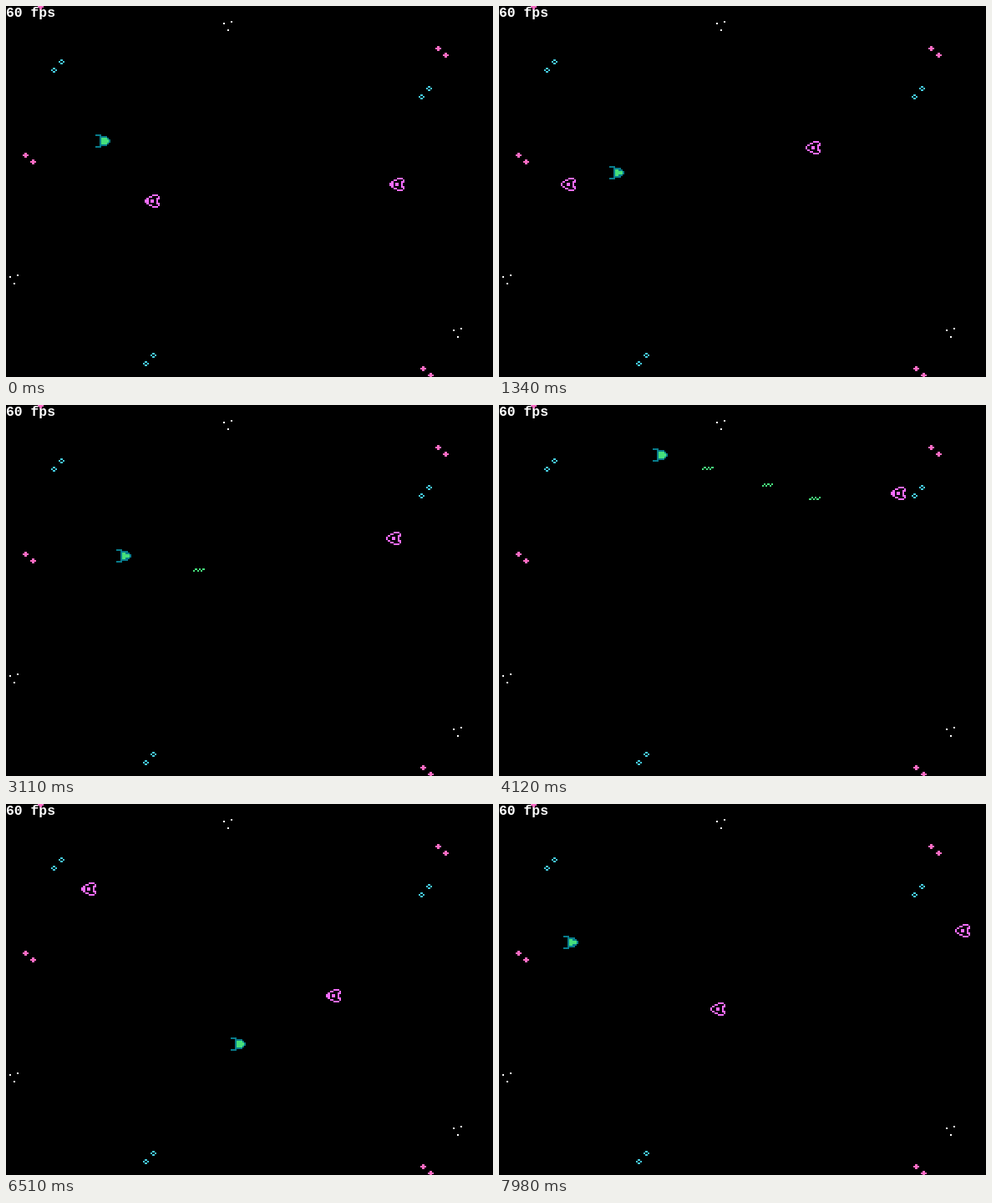
An HTML page with a canvas for the animation above (8000 ms loop, 583 px wide and 445 px high).

```html
<!DOCTYPE html>
<html lang="en">
<head>
<meta charset="utf-8">
<title>Space shooter</title>
<style>
html, body { margin: 0; width: 100%; height: 100%; overflow: hidden; background: #000; }
canvas { display: block; width: 583px; height: 445px; }
</style>
</head>
<body>
<canvas id="stage" width="583" height="445"></canvas>
<script>
const ctx = document.getElementById('stage').getContext('2d');
const W = 583, H = 445, LOOP = 8000;
const CELL_W = 2.25, CELL_H = 2;
const COLORS = {
  t: '#087c8c', g: '#46e07c', m: '#f46cff', p: '#ff6cc4', c: '#44c8dc', w: '#fff'
};

// Ships are symmetric about their long axis.
const mirror = half => [...half, ...half.slice().reverse()];
const SHIPS = [
  mirror(['ttt', '..tttt', '..tgggt', '..tggggt']),
  mirror(['ttt', '..tttt', '..tggtt', '..tggggt'])
];
const ENEMIES = ['mm.mm.m', 'm..mm.m'].map(middle =>
  mirror(['....mmm', '..mm...m', '.m....mm', middle]));
const BULLET = ['.g.g.g', 'g.g.g'];

// Clusters repeat one small shape at offsets counted in cells.
const STARS = [
  { shape: ['.p', 'ppp', '.p'], cells: [[0, 0], [4, 4]],
    at: [[20, 176], [514, 48], [496, 432], [29, -10]] },
  { shape: ['.c', 'c.c', '.c'], cells: [[4, 0], [0, 5]],
    at: [[54, 64], [494, 96], [164, 416]] },
  { shape: ['w'], cells: [[0, 1], [4, 0], [2, 5]],
    at: [[260, 18], [4, 322], [535, 386]] }
];

// Steering: from each time on, the ship heads for the given place.
const STEER_X = [[600, 132], [3285, 184], [4880, 269], [6600, 77]];
const STEER_Y = [
  [0, 138], [300, 200], [1970, 232], [2237, 198], [2970, 50], [4347, 296], [6443, 142], [7727, 166]
];
const ENEMY_Y = [234, 214, 170, 200, 160, 106, 102, 230, 246, 152];
const FIRED = [2750, 2900, 3250, 3687, 3820, 3987, 5033, 5213];

function steer(pos, speed, orders, t) {
  orders.forEach(([from, goal], i) => {
    const until = Math.min(t, orders[i + 1]?.[0] ?? LOOP);
    const reach = Math.max(0, until - from) * speed;
    pos += Math.sign(goal - pos) * Math.min(reach, Math.abs(goal - pos));
  });
  return pos;
}
const shipX = t => steer(107, 0.146, STEER_X, t);
const shipY = t => steer(162, 0.12, STEER_Y, t);

// Steady approach with a slight drift in game speed.
const scroll = t => 0.2825 * t + 7 * Math.sin(2 * Math.PI * t / 7600);

const enemies = ENEMY_Y.map((y, k) => ({ y, x: t => 166 + 293 * k - scroll(t), end: LOOP }));
const shots = FIRED.map(from => ({
  from, y: shipY(from), x: t => shipX(from) + 2 + 0.427 * (t - from), end: LOOP
}));

const enemyAlive = (e, t) => t < e.end && e.x(t) >= 0 && e.x(t) < W;
const shotAlive = (s, t) => t >= s.from && t < s.end && s.x(t) < W;

// Find every hit once, so that each picture depends on the time alone.
for (let t = 0; t < LOOP; t += 10) {
  for (const s of shots) {
    for (const e of enemies) {
      const gap = e.x(t) - s.x(t);
      const touching = Math.abs(e.y - s.y) < 9 && gap < 14 && gap > -18;
      if (touching && enemyAlive(e, t) && shotAlive(s, t)) s.end = e.end = t;
    }
  }
}

function sprite(rows, x, y) {
  rows.forEach((row, r) => [...row].forEach((key, c) => {
    if (key === '.') return;
    const left = Math.round(x + c * CELL_W), right = Math.round(x + (c + 1) * CELL_W);
    ctx.fillStyle = COLORS[key];
    ctx.fillRect(left, Math.round(y) + r * CELL_H, right - left, CELL_H);
  }));
}

function draw(t) {
  const pose = Math.floor(t / 400) % 2;
  ctx.fillStyle = '#000';
  ctx.fillRect(0, 0, W, H);

  for (const { shape, cells, at } of STARS)
    for (const [x, y] of at)
      for (const [c, r] of cells) sprite(shape, x + c * CELL_W, y + r * CELL_H);

  for (const s of shots) if (shotAlive(s, t)) sprite(BULLET, s.x(t), s.y - 2);
  for (const e of enemies) if (enemyAlive(e, t)) sprite(ENEMIES[pose], Math.round(e.x(t)), e.y - 8);
  sprite(SHIPS[pose], Math.round(shipX(t)), shipY(t) - 8);

  ctx.fillStyle = '#fff';
  ctx.font = 'bold 16.4px "Liberation Mono", monospace';
  ctx.fillText('60 fps', 0, 13);
}

const start = performance.now();
function frame() {
  draw((performance.now() - start) % LOOP);
  requestAnimationFrame(frame);
}
frame();
</script>
</body>
</html>
```
